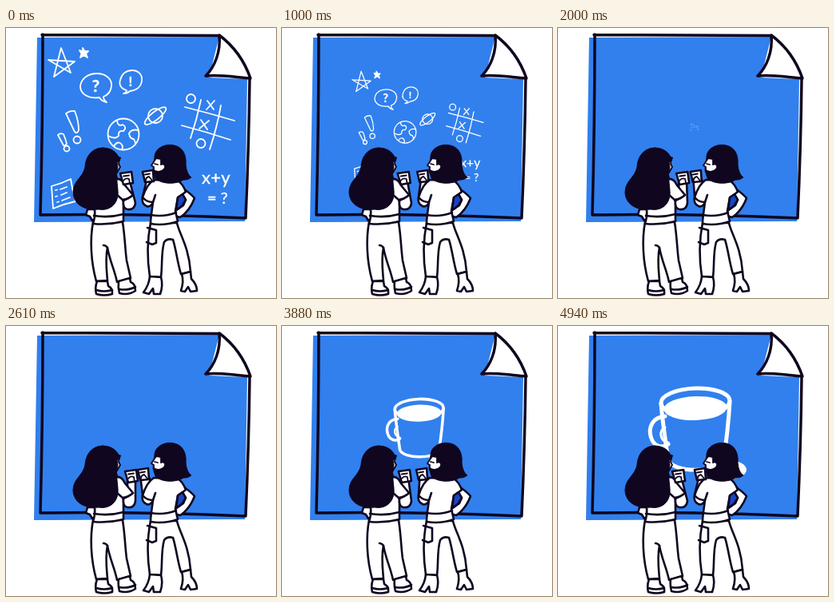
Animation of 338 by 338 pixels, one loop 5000 ms. Source, as an HTML page:

```html
<!DOCTYPE html>
<html lang="en">
<head>
<meta charset="utf-8">
<title>Shared board</title>
<style>
  html, body { margin: 0; height: 100%; overflow: hidden; background: #fff; }
  svg { display: block; width: 100vw; height: 100vh; }
  path, ellipse, circle { stroke-linecap: round; stroke-linejoin: round; }
  .ink, .body { fill: none; stroke: #10061f; stroke-width: 2.6; }
  .body { fill: #fff; }
  .bold { stroke-width: 3.5; }
  .fine { stroke-width: 1.8; }
  .hair { fill: #10061f; stroke: #10061f; stroke-width: 1; }
  .chalk { fill: none; stroke: #fff; stroke-width: 1.8; }
  .chalk text { fill: #fff; stroke-width: 0.4; font-family: Lato, sans-serif; }
  .mug { fill: none; stroke: #fff; stroke-width: 5; }
  .mug .thin { stroke-width: 3; }
  .solid { fill: #fff; }
  .mug .solid { stroke: none; }
</style>
</head>
<body>
<svg viewBox="0 0 338 338">
  <!-- board -->
  <path fill="#3180ee" d="M39 12L267 11L254 62L302 64L299 242L35 243Z"/>
  <path class="ink bold" d="M45 8.500L267 9.500M46 8Q46 120 43 234Q170 232 300 238Q304 150 305 64"/>
  <path class="body bold" d="M267 9C269 30 261 49 250 60C269 58 289 62 306 63C298 40 283 21 267 9Z"/>

  <g id="doodles" class="chalk">
    <path d="M60 61L69 25L81 56L53 40L86 42Z"/>
    <path class="solid" d="M96 25L98.500 29L103 29L100 32L102 37L97.500 34L93 37L94.500 32L92 28L96 29Z"/>
    <path d="M117 87C104 89 93 83 93 73C94 63 103 57 114 57C125 57 133 64 132 73C131 80 127 84 122 86Q122 90 126 93Q120 92 117 87Z"/>
    <text x="107.500" y="80" font-size="21" font-weight="bold">?</text>
    <path d="M151 78C144 76 141 71 143 65C145 57 151 53 158 53C166 53 171 59 170 66C169 75 162 78 155 79Q152 82 147 82Q151 81 151 78Z"/>
    <text x="153.500" y="73" font-size="17" font-weight="bold">!</text>
    <path d="M75 107Q80 103 86 104Q91 116 91 128Q89 133 86 130ZM65 134Q68 131 72 133Q75 140 76 145Q74 148 72 147Z"/>
    <circle cx="89" cy="140" r="4.500"/>
    <circle cx="76" cy="151" r="3.500"/>
    <circle cx="147" cy="133" r="19.500"/>
    <path d="M139 116Q140 124 146 121Q152 124 147 129Q140 128 141 135Q137 140 128 135M166 128Q157 126 154 132Q155 139 160 139Q162 142 162 146M135 148Q140 140 145 146Q147 149 145 152"/>
    <circle cx="187" cy="110" r="9"/>
    <g transform="rotate(-38 187 110)">
      <ellipse cx="187" cy="110" rx="16.500" ry="5"/>
    </g>
    <path d="M244 90Q239 114 231 138M269 97Q264 125 255 152M224 99Q256 107 286 116M220 122Q251 130 281 140"/>
    <circle cx="231.500" cy="88.500" r="5.500"/>
    <circle cx="244" cy="144.500" r="5.500"/>
    <path d="M252 91L260 102M261 91L251 102M244 115L252 127M254 116L242 126"/>
    <text x="245" y="195" font-size="22" letter-spacing="0.300">x+y</text>
    <text x="252" y="220" font-size="20">= ?</text>
    <path d="M57 198Q69 195 81 189Q83 203 87 217Q73 220 59 226ZM62 203L64 202.500M68 202L76 199M62 211L64 210.500M69 209L76 206M64 218L66 217.500M70 216L80 212"/>
  </g>

  <g id="cup" class="mug">
    <ellipse cx="172" cy="95" rx="43" ry="17" transform="rotate(-2 172 95)"/>
    <ellipse class="solid" cx="172" cy="103" rx="39.500" ry="15" transform="rotate(-2 172 103)"/>
    <path d="M129 97C131 122 135 147 138 168C144 184 200 184 207 169Q213 130 215 95"/>
    <path d="M134 113C119 114 113 126 116 138C119 150 129 154 138 148"/>
    <path class="thin" d="M134 127C126 130 127 144 138 146"/>
    <ellipse class="solid" cx="213" cy="180" rx="23" ry="12"/>
  </g>

  <!-- left person -->
  <path class="body" d="M102 227L100 234L105 236L108 241L116 238L115 227Z"/>
  <path class="body" d="M113 317C106 292 105 264 109 243H146C149 262 149 276 151 291L156 313L139 318C136 303 130 292 127 275C124 290 126 304 127 316Z"/>
  <path class="body" d="M108 220Q114 228 109 245Q128 247 147 242L147 218L138 185Z"/>
  <path class="ink" d="M110 235Q129 238 147 233M127 275Q125 272 122 272"/>
  <path class="body" d="M114 317Q111 325 113 333Q123 336 133 333Q134 326 128 323L127 317ZM141 317Q140 325 142 332Q153 335 162 329Q162 320 156 318L155 313Z"/>
  <path class="ink" d="M113 328Q122 331 133 328M142 327Q153 329 162 324"/>
  <path id="leftForearm" class="body"/>
  <path class="body" d="M138 189Q145 188 149 197L159 209Q154 214 146 215L139 209Z"/>
  <g id="leftPhone">
    <path class="body" d="M147 182L161 180L163 194L151 196Z"/>
    <path class="ink fine" d="M151 185.500L158 184.500M151 191Q154 187 158 189L159 195"/>
  </g>
  <path class="body fine" d="M136 162L142 162L141 170L143 174L139 181L133 180Z"/>
  <path class="hair" d="M121 150C132 150 139 156 141 162L143.500 162L142 167L139 168C142 178 137 182 138 190C140 200 141 207 139 214C136 224 126 229 116 227C96 229 84 219 84 205C85 190 96 188 99 174C100 158 110 150 121 150Z"/>

  <!-- right person -->
  <path class="body" d="M181 244H214C217 258 229 274 231 305L219 308C214 291 213 277 209 265Q202 263 198 268C194 282 196 296 194 312L180 311C176 285 177 264 181 244Z"/>
  <path class="ink" d="M177 250L188 253L188 269L183 271L176 268"/>
  <path class="body" d="M180 311Q179 322 172 331L179 333L184 326L185 333L193 333Q197 322 194 312ZM220 308Q223 317 219 329L224 330L228 324L231 330L239 329Q239 321 232 314L231 305Z"/>
  <path class="body" d="M219 199Q231 207 236 213Q230 229 218 237L211 235L212 229L222 222L225 215L213 207Z"/>
  <path id="rightForearm" class="body"/>
  <path class="body" d="M185 190Q176 196 171 212Q176 218 184 218L182 233Q181 240 181 245Q198 248 215 242L212 229L215 213L225 205Q222 196 215 191Z"/>
  <path class="ink" d="M181 234Q198 237 213 231M184 218L187 209"/>
  <path class="ink" style="fill:#1746c5" d="M215 212L221 208L225 215L221 222L213 228Z"/>
  <g id="rightPhone">
    <path class="body" d="M167 180L180 178L181 192L170 193Z"/>
    <path class="ink fine" d="M170 183.500L176 182.500M171 193Q170 187 175 186L179 191"/>
  </g>
  <path class="hair" d="M186 163C185 152 197 145 208 146.500C222 148 226 160 225 171Q226 183 232 187Q227 191 222 190C214 196 194 196 187 188L184 178Q185 165 186 163Z"/>
  <path class="body fine" d="M188 163L182 172L185 174L185 178Q190 181 194 179Q200 177 199 172Q196 169 194 171L194 164Z"/>
  <path class="ink fine" d="M186 170L190 171"/>
</svg>
<script>
  const LOOP = 5000;
  const find = id => document.getElementById(id);
  const ease = (t, start, length) => {
    const p = Math.min(1, Math.max(0, (t - start) / length));
    return (1 - Math.cos(Math.PI * p)) / 2;
  };

  // Scale around the point where the pinch gestures meet.
  function zoom(id, scale) {
    const group = find(id);
    group.style.display = scale > 0.002 ? '' : 'none';
    group.setAttribute('transform', `translate(171 124) scale(${scale}) translate(-171 -124)`);
  }

  function draw(now) {
    const t = now % LOOP;
    zoom('doodles', 1 - ease(t, 270, 2000));
    zoom('cup', ease(t, 2830, 1650));

    const reach = -3 * Math.cos(2 * Math.PI * (t - 100) / LOOP) - 1;
    find('leftPhone').setAttribute('transform', `translate(${reach} 0)`);
    find('rightPhone').setAttribute('transform', `translate(${-reach} 0)`);
    const l = 150 + reach, r = 179 - reach;
    find('leftForearm').setAttribute('d',
      `M147 216Q146 226 152 227Q161 228 162 219L${l + 10} 196L${l + 8} 190L${l} 192L${l} 198L153 213Z`);
    find('rightForearm').setAttribute('d',
      `M184 218Q181 225 176 223Q169 220 171 211L${r - 8} 195L${r - 7} 189L${r + 1} 187L${r + 4} 194L182 205Z`);
    requestAnimationFrame(draw);
  }
  requestAnimationFrame(draw);
</script>
</body>
</html>
```
